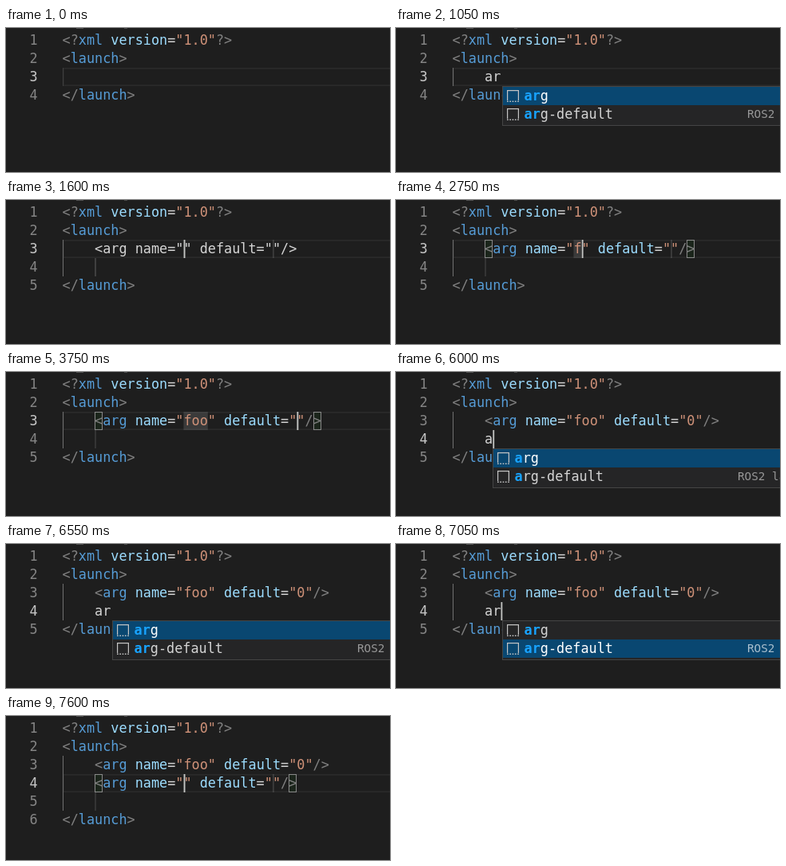
Animation, 481 px wide and 181 px high, one loop 8 s. Source, as an HTML page with a canvas:

```html
<!DOCTYPE html>
<html lang="en">
<head>
<meta charset="utf-8">
<title>Launch file editor</title>
<style>
  html, body { margin: 0; width: 100%; height: 100%; overflow: hidden; background: #1e1e1e; }
  canvas { display: block; }
</style>
</head>
<body>
<canvas id="stage" width="481" height="181"></canvas>
<script>
const ctx = document.getElementById('stage').getContext('2d');
const LOOP = 8000, W = 481, H = 181;
const LEFT = 70.5, CELL = 10.13, TOP = 4, ROW = 23, BASE = 17;
const SIZE = 16.83, FAMILY = '"DejaVu Sans Mono", monospace';
const COLOR = {
  bg: '#1e1e1e', text: '#d4d4d4', mark: '#808080', tag: '#569cd6',
  attr: '#9cdcfe', string: '#ce9178', caret: '#c4c5c3', guide: '#404040',
  activeGuide: '#707070', stop: 'rgba(124,124,124,.3)'
};

const indent = s => '    ' + s;
const arg = (name = '', value = '') => indent(`<arg name="${name}" default="${value}"/>`);
const NAME_COL = 15;
const valueCol = name => 26 + name.length;

// Each step overrides only what changes at its time.
const steps = [
  [0, { body: [''], row: 2, caret: 4, blink: false, plain: false, popup: null,
        brackets: false, stops: [], border: true, inner: false, lit: false }],
  [200, { blink: true }],
  [500, { body: [indent('a')], caret: 5, plain: true, lit: true }],
  [550, { body: [indent('ar')], caret: 6, popup: { pick: 0, typed: 2 } }],
  [1050, { blink: false }],
  [1400, { popup: { pick: 1, typed: 2 } }],
  [1550, { body: [arg(), ''], caret: NAME_COL, blink: true, popup: null, inner: true }],
  [1600, { stops: ['', ''] }],
  [1650, { plain: false, brackets: true }],
  [2100, { blink: false }],
  [2600, { blink: true }],
  [2750, { body: [arg('f'), ''], caret: 16, stops: ['f', ''] }],
  [3150, { body: [arg('foo'), ''], caret: 18, stops: ['foo', ''] }],
  [3650, { blink: false }],
  [3750, { caret: 29, blink: true }],
  [4250, { blink: false }],
  [4750, { body: [arg('foo', '0'), ''], caret: 30, blink: true, stops: ['foo', '0'] }],
  [5200, { blink: false }],
  [5300, { row: 3, caret: 4, blink: true, stops: [], brackets: false, border: false, inner: false }],
  [5950, { body: [arg('foo', '0'), indent('a')], caret: 5, plain: true }],
  [6000, { popup: { pick: 0, typed: 1 } }],
  [6100, { body: [arg('foo', '0'), indent('ar')], caret: 6, popup: { pick: 0, typed: 2 } }],
  [6550, { blink: false }],
  [6900, { popup: { pick: 1, typed: 2 } }],
  [7050, { blink: true }],
  [7550, { body: [arg('foo', '0'), arg(), ''], caret: NAME_COL, popup: null,
           stops: ['', ''], border: true, inner: true }],
  [7600, { plain: false, brackets: true }]
];

const colX = col => LEFT + col * CELL;
const rowY = row => TOP + row * ROW;

function stateAt(t) {
  const state = {};
  for (const [at, change] of steps) if (at <= t) Object.assign(state, change);
  return state;
}

function box(x, y, w, h, color) {
  ctx.fillStyle = color;
  ctx.fillRect(x, y, w, h);
}

function frame(x, y, w, h, color, width = 1) {
  ctx.strokeStyle = color;
  ctx.lineWidth = width;
  ctx.strokeRect(x + width / 2, y + width / 2, w - width, h - width);
}

function write(text, x, y, color, size = SIZE, weight = 'normal') {
  ctx.font = `${weight} ${size}px ${FAMILY}`;
  ctx.fillStyle = color;
  ctx.fillText(text, x, y);
}

function writeCode(line, row, plain) {
  let tagNext = false;
  for (const m of line.matchAll(/"[^"]*"|<[?\/]?|[?\/]?>|=|[\w.]+/g)) {
    const token = m[0];
    let color = COLOR.text;
    if (!plain && token !== '=') {
      if (token[0] === '"') color = COLOR.string;
      else if (/[<>]/.test(token)) color = COLOR.mark;
      else color = tagNext ? COLOR.tag : COLOR.attr;
    }
    tagNext = token[0] === '<';
    write(token, colX(m.index), rowY(row) + BASE, color);
  }
}

function drawGuides(s) {
  const outer = s.lit ? COLOR.activeGuide : COLOR.guide;
  box(71, rowY(2), 1, s.body.length * ROW, outer);
  if (s.inner) {
    box(111.5, rowY(1 + s.body.length), 1, ROW, s.plain ? '#606060' : '#4a4a4a');
  }
}

function drawStops(s) {
  if (!s.stops.length) return;
  const [name, value] = s.stops;
  const y = rowY(s.row);
  const mark = (col, text) => box(colX(col), y, Math.max(2, text.length * CELL), ROW, COLOR.stop);
  mark(NAME_COL, name);
  mark(valueCol(name), value);
}

function drawBrackets(s) {
  const line = s.body[s.row - 2];
  for (const col of [4, line.length - 1]) {
    const x = Math.round(colX(col));
    box(x, rowY(s.row), 10, ROW, 'rgba(0,100,0,.1)');
    frame(x, rowY(s.row), 10, ROW, '#888888');
  }
}

function drawIcon(x, y) {
  box(x, y, 15, 1.2, '#c5c5c5');
  box(x, y, 1.2, 13, '#c5c5c5');
  box(x + 13.8, y, 1.2, 13, '#c5c5c5');
  for (let i = 0; i < 5; i++) box(x + i * 3.3, y + 13.6, 1.7, 1.4, '#c5c5c5');
}

function drawPopup(s) {
  const { pick, typed } = s.popup;
  const x = Math.round(colX(s.caret) + 0.3) + (typed === 2 ? 1 : 0);
  const y = rowY(s.row + 1);
  box(x, y, W, 50, '#252526');
  box(x + 1, y + 1 + pick * ROW, W, ROW, '#094771');
  frame(x, y, W, 50, '#454545');
  ['arg', 'arg-default'].forEach((word, i) => {
    const top = y + 1 + i * ROW;
    const base = top + BASE;
    const color = i === pick ? '#ffffff' : COLOR.text;
    const textX = x + 27.5;
    drawIcon(x + 6, top + 4);
    write(word.slice(0, typed), textX, base, '#18a3ff', SIZE, 'bold');
    write(word.slice(typed), textX + typed * CELL, base, color);
    if (i === 1) {
      ctx.globalAlpha = 0.65;
      write('ROS2 launch', x + 307, base - 1, color, 14.3);
      ctx.globalAlpha = 1;
    }
  });
}

function draw(t) {
  const s = stateAt(t);
  const lines = ['<?xml version="1.0"?>', '<launch>', ...s.body, '</launch>'];
  box(0, 0, W, H, COLOR.bg);
  box(88, 0, 9, 1, '#505050');
  box(148, 0, 4, 1, '#484848');

  if (s.border) frame(71, rowY(s.row), W - 71 + 3, ROW, '#2a2a2a', 1.7);
  drawGuides(s);
  drawStops(s);
  if (s.brackets) drawBrackets(s);
  lines.forEach((line, row) => {
    write(String(row + 1), 29.6, rowY(row) + BASE, row === s.row ? '#c6c6c6' : '#858585');
    writeCode(line, row, s.plain && row === s.row);
  });
  if (s.blink) box(colX(s.caret) + 0.2, rowY(s.row), 1.8, ROW, COLOR.caret);
  if (s.popup) drawPopup(s);
}

const start = performance.now();
function tick() {
  draw((performance.now() - start) % LOOP);
  requestAnimationFrame(tick);
}
tick();
</script>
</body>
</html>
```
